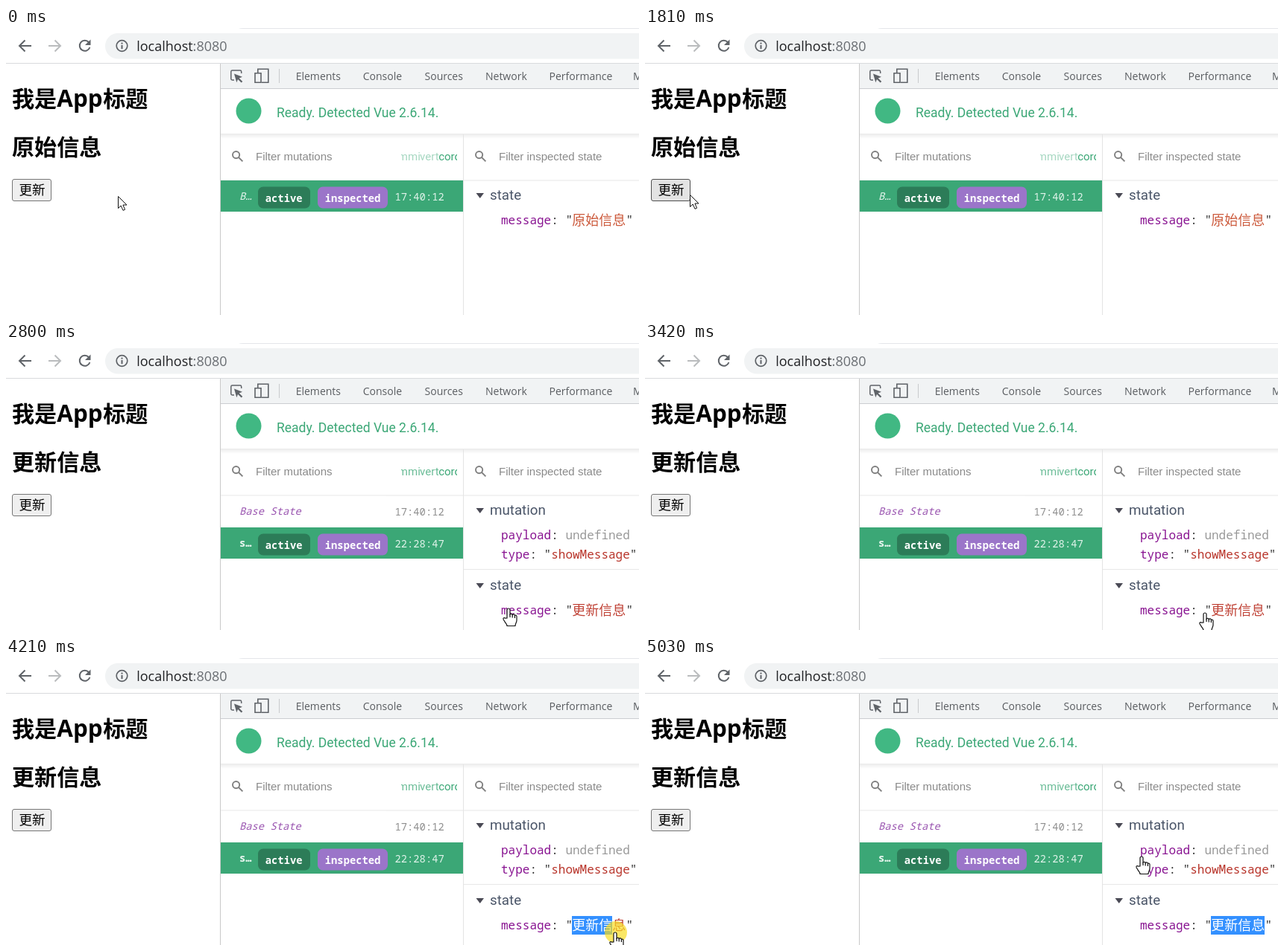
Animation, 849 px wide and 386 px high, one loop 5160 ms. Source, as an HTML page:

```html
<!DOCTYPE html>
<html lang="zh-CN">
<head>
<meta charset="utf-8">
<title>Vuex mutation demo</title>
<style>
html, body { margin: 0; width: 100%; height: 100%; overflow: hidden; background: #fff; }
svg { display: block; }
text { white-space: pre; }
.ui { font-family: "Open Sans", "Noto Sans", sans-serif; }
.rb { font-family: Roboto, sans-serif; }
.ar { font-family: "Liberation Sans", Arial, sans-serif; font-size: 15px; fill: #8a8a8a; }
.cjk { font-family: "Noto Sans CJK SC", "Noto Sans CJK", "Noto Sans CJK JP", sans-serif; }
.mono { font-family: "Noto Sans Mono", "DejaVu Sans Mono", monospace; font-size: 13.8px; }
.code { font-family: "Noto Sans Mono", "DejaVu Sans Mono", monospace; font-size: 16px; fill: #303030; }
.h { font-size: 30.1px; font-weight: 700; }
.tab { font-size: 14px; fill: #5a5d61; }
.head { font-size: 18.75px; fill: #4a5568; }
.act { font-size: 15px; fill: #3ba776; }
.key { fill: #881391; }
.str { fill: #b8342a; }
.value { font-size: 18px; font-weight: 300; }
.bold { font-weight: 700; }
.it { font-style: italic; }
.line { fill: none; stroke: #5f6368; stroke-width: 2; }
</style>
</head>
<body>
<svg id="stage" width="849" height="386" viewBox="0 0 849 386"></svg>
<script>
const LOOP = 5160;
const GREEN = '#3ba776';

// Markup helpers
const text = (x, y, cls, s, extra = '') => `<text x="${x}" y="${y}" class="${cls}" ${extra}>${s}</text>`;
const rect = (x, y, w, h, fill, extra = '') => `<rect x="${x}" y="${y}" width="${w}" height="${h}" fill="${fill}" ${extra}/>`;
const path = (d, extra = '') => `<path class="line" d="${d}" ${extra}/>`;
const group = (id, body) => `<g id="${id}">${body}</g>`;

const search = x => `<g transform="translate(${x} 165)" fill="none" stroke="#808080" stroke-width="1.9">
  <circle cx="5.6" cy="5.6" r="4.6"/><path d="M9 9L14.4 14.4"/></g>`;

const badge = (x, y, w, fill, label) =>
  rect(x, y, w, 29, fill, 'rx="7"') + text(x + 9.8, y + 20, 'mono bold', label, 'fill="#fff"');

const activeRow = (y, name, cls, time) =>
  rect(288, y, 325, 42, GREEN) +
  text(313, y + 26, 'mono ' + cls, name, 'fill="#e6f5ee"') +
  badge(338, y + 8.5, 70, '#2c7c58', 'active') +
  badge(418, y + 8.5, 94, '#9b75c9', 'inspected') +
  text(521.5, y + 27, 'mono', time, 'fill="#e0f3ea"');

const section = (y, name) =>
  `<path d="M630.5 ${y - 9}h10.5l-5.25 7z" fill="#4a4a55"/>` + text(649, y, 'rb head', name);

const field = (y, key, value) =>
  text(664, y, 'code', `<tspan class="key">${key}</tspan>: ${value}`);

const message = (y, value, color) =>
  field(y, 'message', '"') +
  text(759.3, y + 1, 'cjk value', value, `fill="${color}"`) +
  text(831.5, y, 'code', '"');

const action = (x, clipX, label, id = '') =>
  `<svg x="${clipX}" y="160" width="25" height="26">${text(x - clipX, 18, 'rb act ' + id, label)}</svg>`;

const tabs = [[388.7, 'Elements'], [478.7, 'Console'], [561.5, 'Sources'], [643, 'Network'], [728.5, 'Performance'], [841, 'Memory']];

const chrome =
  '<path d="M312 0H849V1H318Q314 1 312 0Z" fill="#e4e6ea"/>' +
  path('M34 24H18.5M25.5 16.5L18 24l7.5 7.5') +
  path('M57 24H72.5M65.5 16.5L73 24l-7.5 7.5', 'style="stroke:#babcbe"') +
  path('M111 19.2A7 7 0 1 0 112.4 26') +
  '<path d="M113.5 15.5V23H106z" fill="#5f6368"/>' +
  rect(133, 7, 760, 34.5, '#f1f3f4', 'rx="17.2"') +
  '<circle cx="155.5" cy="24" r="7.3" class="line" style="stroke-width:1.7"/>' +
  rect(154.5, 23, 2, 5.2, '#5f6368') + rect(154.5, 19.6, 2, 2, '#5f6368') +
  text(175.2, 31, 'ui', 'localhost<tspan fill="#6a6e73">:8080</tspan>', 'font-size="18" fill="#202124"') +
  rect(0, 47, 849, 1, '#d8dadd');

const page =
  text(8, 105.5, 'cjk h', '我是') + text(68.3, 105.5, 'ui h', 'App', 'style="font-size:31.3px"') + text(130.2, 105.5, 'cjk h', '标题') +
  text(8, 170.5, 'cjk h', '', 'id="heading"') +
  '<rect id="button" x="8.5" y="203.5" width="52" height="29" rx="2.5"/>' +
  text(17.5, 224, 'cjk', '更新', 'font-size="17.5"');

const toolbar =
  rect(288, 48, 561, 34, '#f1f3f4') + rect(288, 81, 561, 1, '#cbcdd1') + rect(287, 48, 1, 338, '#c9c9c9') +
  path('M306 70H303.5Q301.8 70 301.8 68.3V58.7Q301.8 57 303.5 57H314Q315.7 57 315.7 58.7V61', 'style="stroke-width:1.5"') +
  '<path d="M306 61.5l11 4.2-4.3 1.7 4.6 4.6-1.7 1.6-4.6-4.6-1.7 4.2z" fill="#5f6368"/>' +
  path('M337.8 60V55.2H351.8V73.2H343M334 60.8H342V73.2H334Z', 'style="stroke-width:1.6"') +
  rect(366, 55, 1, 19, '#c8cacd') +
  tabs.map(([x, s]) => text(x, 70, 'ui tab', s)).join('');

const panel =
  '<circle cx="325.5" cy="111.5" r="17" fill="#41b883"/>' +
  text(363, 120, 'rb', 'Ready. Detected Vue 2.6.14.', `font-size="17.5" fill="${GREEN}"`) +
  rect(288, 142, 561, 7, 'url(#shade)') +
  search(303) + search(629) +
  text(335, 178, 'ar', 'Filter mutations') + text(661, 178, 'ar', 'Filter inspected state') +
  action(507.5, 530, 'Commit', 'dim') + action(538, 555, 'Revert', 'dim') + action(563, 580, 'Record') +
  rect(288, 204.5, 561, 1, '#e8e8e8');

const before = activeRow(205, 'B…', 'it', '17:40:12') + section(231, 'state') + message(264, '原始信息', '#cc5a3c');

const after =
  text(313, 231, 'mono it', 'Base State', 'fill="#9a55b0"') +
  text(521.5, 232, 'mono', '17:40:12', 'fill="#8f8f8f"') +
  activeRow(248, 's…', 'bold', '22:28:47') +
  section(231, 'mutation') +
  field(264, 'payload', '<tspan fill="#999">undefined</tspan>') +
  field(289.5, 'type', '"<tspan class="str">showMessage</tspan>"') +
  rect(614, 304, 235, 1, '#e8e8e8') +
  section(332, 'state') + message(365, '更新信息', '#c04438') +
  rect(759, 347, 0, 25, '#3390ff', 'id="selection"') +
  text(759.3, 366, 'cjk value', '', 'id="selected" fill="#fff"');

const pointer =
  '<circle id="press" r="15" fill="#f7dc1c" opacity=".68"/>' +
  '<path id="arrow" d="M.5 .5V16.5L4.2 13 7 19.3 9.6 18.2 6.9 12H12Z" fill="#fff" stroke="#111"/>' +
  `<g id="hand" transform="translate(-1 0)" fill="#fff" stroke="#111" stroke-width="1.2">
    <path d="M-2 13V2a2 2 0 0 1 4 0V8a1.8 1.8 0 0 1 3.2 .6a1.8 1.8 0 0 1 3.2 .8a1.7 1.7 0 0 1 2.6 1.4V16c0 3-2 4-2 7.5H-2c0-2.5-2-3.5-3.2-6l-1.6-2.5c-1-2 1-3.2 2.4-1.8z"/>
    <path d="M2 8v4M5.2 9v3.5M8.4 10v3"/></g>`;

const stage = document.getElementById('stage');
stage.innerHTML =
  `<defs><linearGradient id="shade" x2="0" y2="1">
    <stop stop-color="#000" stop-opacity=".08"/><stop offset="1" stop-color="#000" stop-opacity="0"/></linearGradient></defs>` +
  rect(0, 0, 849, 386, '#fff') + chrome + page + toolbar + panel +
  group('before', before) + group('after', after) +
  rect(613, 143, 1, 243, '#e4e4e4') + group('pointer', pointer);

const el = id => document.getElementById(id);
const show = (id, on) => el(id).setAttribute('display', on ? 'inline' : 'none');

// Pointer moves: first step, last step, number of steps, end x, end y
const START = [150, 226];
const MOVES = [
  [130, 620, 8, 47, 222],
  [680, 680, 1, 43, 220],
  [1810, 1810, 1, 60, 224],
  [1880, 2300, 7, 220, 248],
  [2370, 2370, 1, 257, 249],
  [2410, 2800, 7, 675, 357],
  [2880, 2880, 1, 677, 362],
  [3020, 3270, 4, 747, 363],
  [3420, 3530, 3, 763, 363],
  [3740, 3740, 1, 765, 363],
  [3810, 3880, 2, 783, 363],
  [3945, 4210, 5, 818, 369],
  [4290, 4350, 2, 827, 371],
  [4690, 4890, 4, 650, 300],
  [4960, 5030, 2, 667, 267],
];

function pointerAt(t) {
  let [x, y] = START;
  for (const [first, last, steps, endX, endY] of MOVES) {
    if (t < first) break;
    const gap = (last - first) / Math.max(1, steps - 1) || 1;
    const p = Math.min(steps, Math.floor((t - first) / gap + 1e-6) + 1) / steps;
    x += (endX - x) * p;
    y += (endY - y) * p;
  }
  return [x, y];
}

function setButton(hover, pressed) {
  const [fill, stroke] = pressed ? ['#f5f5f5', '#8d8d8d'] : hover ? ['#e3e3e3', '#4f4f4f'] : ['#efefef', '#767676'];
  el('button').setAttribute('fill', fill);
  el('button').setAttribute('stroke', stroke);
}

function render(t) {
  const [x, y] = pointerAt(t);
  const clicking = t >= 940 && t < 1080;
  const dragging = t >= 3740 && t < 4420;
  const committed = t >= 2410;
  const overTools = x > 288;

  el('pointer').setAttribute('transform', `translate(${Math.round(x)} ${Math.round(y)})`);
  show('press', clicking || dragging);
  show('arrow', !overTools);
  show('hand', overTools);

  setButton(x < 61 && y > 203 && y < 233, clicking);
  el('heading').textContent = t < 1880 ? '原始信息' : '更新信息';
  show('before', !committed);
  show('after', committed);
  document.querySelectorAll('.dim').forEach(e => e.setAttribute('opacity', committed ? .75 : .45));

  const count = t < 3740 ? 0 : t >= 4350 ? 4 : Math.max(0, Math.min(4, Math.round((x - 759) / 18)));
  el('selection').setAttribute('width', count * 18);
  el('selected').textContent = '更新信息'.slice(0, count);
}

const begin = performance.now();
function tick() {
  render((performance.now() - begin) % LOOP);
  requestAnimationFrame(tick);
}
tick();
</script>
</body>
</html>
```
